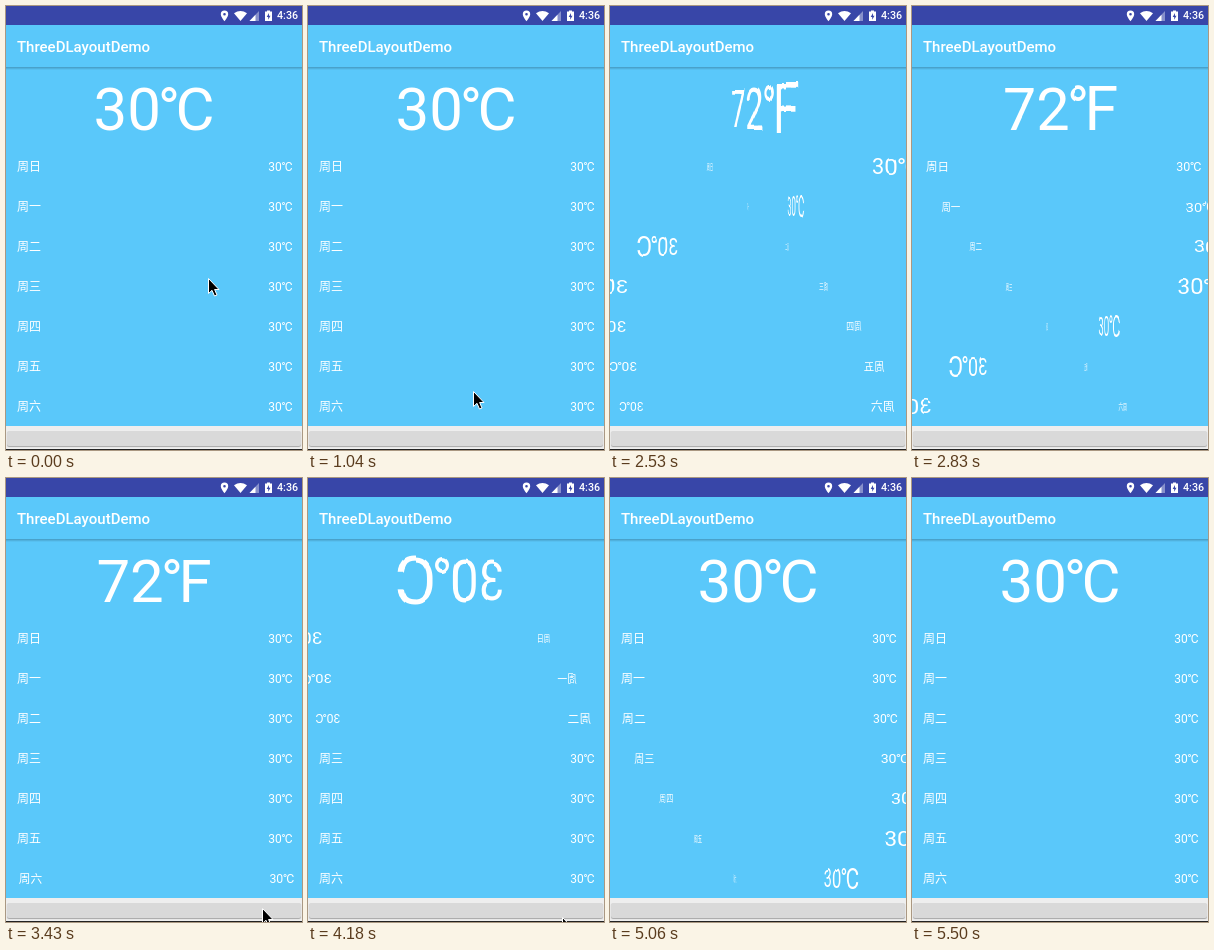
An HTML page with a canvas for the animation above (5.8 s loop, 296 by 444 pixels).

```html
<!DOCTYPE html>
<html lang="zh">
<head>
<meta charset="utf-8">
<title>ThreeDLayoutDemo</title>
<style>
  html, body { margin: 0; width: 100%; height: 100%; overflow: hidden; }
  body { background: #5ac8fa; color: #fff; }
  #stage { position: relative; width: 296px; height: 444px; overflow: hidden; background: #5ac8fa; }
  #stage > * { position: absolute; }
  #status { left: 0; top: 0; width: 296px; height: 19px; background: #3846a8; }
  #clock { left: 271px; top: 0; font: 500 10.7px/20px Roboto, sans-serif; }
  #title { left: 11px; top: 19px; font: 500 15px/44px Roboto, sans-serif; }
  #shade { left: 0; top: 61px; width: 296px; height: 3px; background: linear-gradient(rgba(0,0,0,.23), rgba(0,0,0,0)); }
  #foot { left: 0; top: 420px; width: 296px; height: 24px; background: #eee; }
  #foot::after { content: ""; position: absolute; left: 0; bottom: 0; width: 296px; height: 1px; background: #222; }
  #button { position: absolute; left: 1px; top: 5px; width: 294px; height: 15px; border-radius: 2px;
    background: #d9d9d9; box-shadow: 0 1px 1px rgba(0,0,0,.3); }
  canvas, svg { left: 0; top: 0; overflow: visible; }
</style>
</head>
<body>
<div id="stage">
  <canvas id="list" width="296" height="444"></canvas>
  <div id="status"></div>
  <svg width="296" height="19" fill="#fff">
    <path fill-rule="evenodd" d="M218.500 4.500a3.700 3.700 0 0 1 3.700 3.700c0 2.600-3.700 7-3.700 7s-3.700-4.400-3.700-7a3.700 3.700 0 0 1 3.700-3.700zm0 2.400a1.300 1.300 0 1 0 0 2.600a1.300 1.300 0 0 0 0-2.600z"/>
    <path d="M228 7.200Q234.500 2.600 241 7.200L234.500 15z"/>
    <path d="M243.500 15H253V5z" opacity=".4"/>
    <path d="M243.500 15H249.500V8.700z"/>
    <path fill-rule="evenodd" d="M261 4.500h3v1h2V15h-7V5.500h2zM263 7l-2.300 4h1.500v2.800l2.300-4H263z"/>
  </svg>
  <div id="clock">4:36</div>
  <div id="title">ThreeDLayoutDemo</div>
  <div id="shade"></div>
  <div id="foot"><div id="button"></div></div>
  <svg id="cursor" width="12" height="20">
    <path d="M.5.500V15.500L4 12.300L6.500 18L9 17L6.600 11.500H11z" fill="#000" stroke="#fff" stroke-linejoin="round"/>
  </svg>
</div>
<script>
const LOOP = 5800, SPIN = 974, LAG = 0.1, EYE = 218, MID = 148, LAST = 37;
const CLICKS = [1921, 3931];
const PRESSES = [[1790, 2230], [3880, 4180]];

// pointer stops: time, x, y
const PATH = [
  [0, 202, 272], [150, 196, 292], [290, 172, 378], [440, 158, 418], [590, 158, 418],
  [740, 160, 401], [890, 164, 376], [1040, 165, 385], [1190, 165, 410], [1340, 165, 428],
  [2080, 165, 428], [2380, 168, 450], [3130, 262, 450], [3430, 256, 430],
  [3580, 252, 428], [4030, 252, 428], [4330, 256, 450], [LOOP, 256, 450]
];

const $ = id => document.getElementById(id);
const button = $("button"), cursor = $("cursor");
const ctx = $("list").getContext("2d");
ctx.fillStyle = "#fff";

const roboto = size => `400 ${size}px Roboto, sans-serif`;
const han = '500 12px "Noto Sans CJK SC", "Noto Sans CJK", sans-serif';

// a piece of text, placed relative to the axis it turns around
function piece(text, font, x, y) {
  ctx.font = font;
  return { text, font, x, y, width: ctx.measureText(text).width };
}

// digits with a tight degree sign and letter; align 1 ends at x, 0.5 centres on x
function degrees(n, unit, size, x, y, align) {
  const font = roboto(size);
  const digits = piece(n, font, 0, y);
  const sign = piece("°", font, digits.width - 0.05 * size, y);
  const letter = piece(unit, font, digits.width + 0.244 * size, y);
  const left = x - align * (letter.x + letter.width);
  const parts = [digits, sign, letter];
  for (const p of parts) p.x += left;
  return parts;
}

const headline = {
  C: degrees("30", "C", 60, 0, 20.5, 0.5),
  F: degrees("72", "F", 60, 0, 20.5, 0.5)
};
const rows = [..."日一二三四五六"].map(day => [
  piece("周" + day, han, 11 - MID, 4),
  ...degrees("30", "C", 12, 286.5 - MID, 4, 1)
]);

function write(p) {
  ctx.font = p.font;
  ctx.fillText(p.text, p.x, p.y);
}

// projects the parts column by column, turned around the vertical axis
function drawTurned(parts, cy, angle) {
  const c = Math.cos(angle), s = Math.sin(angle) / EYE;
  for (let col = 0; col < 2 * MID; col++) {
    const x = col + 0.5 - MID;
    const u = x / (c - x * s);
    const scale = 1 / (1 + u * s);
    const a = c * scale * scale;
    if (!(Math.abs(u) < MID) || scale <= 0 || Math.abs(a) < 0.001) continue;
    const reach = 1 + 0.5 / Math.abs(a);
    const seen = parts.filter(p => p.x < u + reach && p.x + p.width > u - reach);
    if (!seen.length) continue;
    ctx.save();
    ctx.beginPath();
    ctx.rect(col, 62, 1, 358);
    ctx.clip();
    ctx.transform(a, 0, 0, scale, col + 0.5 - a * u, cy);
    seen.forEach(write);
    ctx.restore();
  }
}

function drawFlat(parts, cy) {
  ctx.save();
  ctx.translate(MID, cy);
  parts.forEach(write);
  ctx.restore();
}

function drawRow(parts, cy, t, order) {
  const start = CLICKS.filter(c => c <= t).pop();
  const p = start === undefined ? 1 : (t - start) / SPIN - LAG * order;
  if (p >= 0 && p < 1) drawTurned(parts, cy, Math.PI * (1.5 - Math.cos(Math.PI * p) / 2));
  else drawFlat(parts, cy);
}

// the screen refreshes about every 150 ms, with a few shorter ticks
const stamp = k => 150 * k - 10 * [2, 14, 32, 34, 37].filter(n => k >= n).length;

function tick(t) {
  let k = LAST;
  while (stamp(k) > t) k--;
  return stamp(k);
}

function pointer(t) {
  const i = PATH.findIndex(s => s[0] > t);
  const [t0, x0, y0] = PATH[i - 1], [t1, x1, y1] = PATH[i];
  const u = (t - t0) / (t1 - t0);
  return [x0 + (x1 - x0) * u, y0 + (y1 - y0) * u];
}

function draw(t) {
  const unit = t >= CLICKS[0] && t < CLICKS[1] ? "F" : "C";
  ctx.clearRect(0, 0, 296, 444);
  drawRow(headline[unit], 103.5, t, 0);
  rows.forEach((parts, i) => drawRow(parts, 161 + 40 * i, t, i));

  const pressed = PRESSES.some(([a, b]) => t >= a && t < b);
  button.style.background = pressed ? "#cecece" : "#d9d9d9";

  const [x, y] = pointer(t);
  cursor.style.transform = `translate(${x}px, ${y}px)`;
}

const begin = performance.now();
let shown = -1;
function loop() {
  const t = tick((performance.now() - begin) % LOOP);
  if (t !== shown) draw(shown = t);
  requestAnimationFrame(loop);
}
loop();
</script>
</body>
</html>
```
